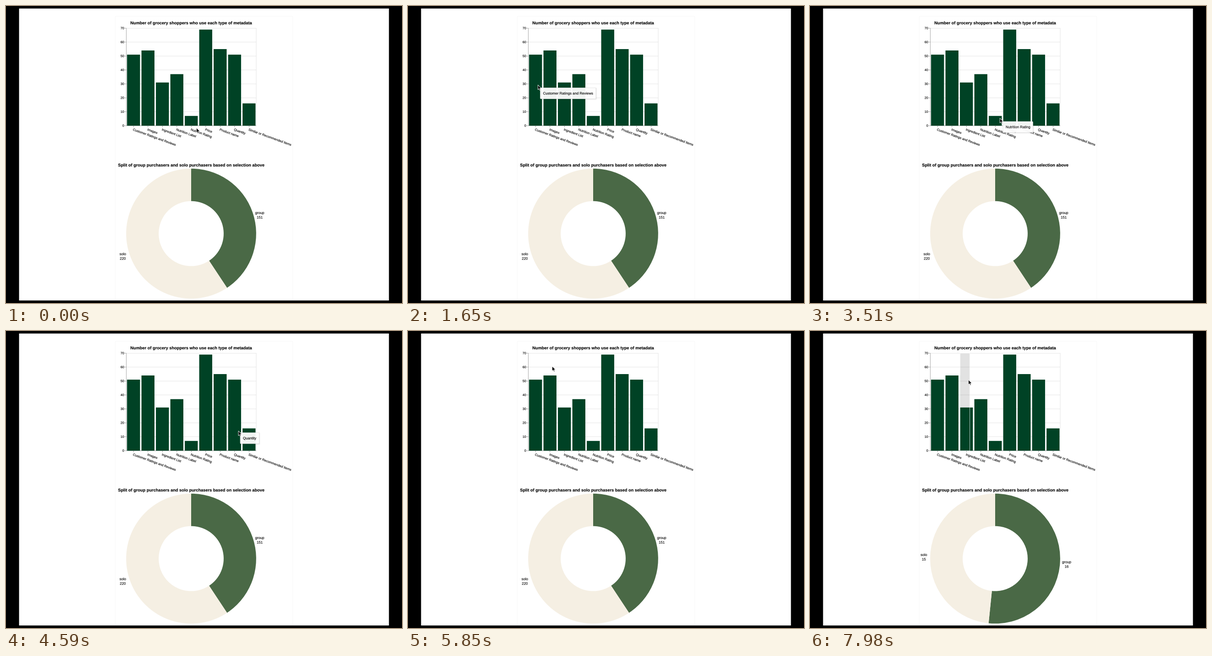
Animation, 864 px wide and 648 px high, one loop 8 s. Source, as a matplotlib script:

```python
import numpy as np
import matplotlib.pyplot as plt
from matplotlib.animation import FuncAnimation
from matplotlib.patches import (FancyBboxPatch, PathPatch, Polygon, Rectangle,
                                Wedge)
from matplotlib.path import Path
from matplotlib.textpath import TextPath

W, H = 864, 648
STEP, FRAMES = 32, 250
K = 0.709
LEFT, RIGHT, TOP, BOTTOM = 262.5, 546, 48.4, 261.1
CX, CY, RADIUS = 404, 496.6, 141.8
PAGE_LEFT, PAGE_RIGHT = 238.5, 625.5
TILT = np.radians(20)

BARS = {
    "Customer Ratings and Reviews": 51, "Images": 54, "Ingredient List": 31,
    "Nutrition Label": 37, "Nutrition Rating": 7, "Price": 69,
    "Product name": 55, "Quantity": 51, "Similar or Recommended Items": 16,
}
NAMES = list(BARS)
BAND = (RIGHT - LEFT) / len(BARS)
UNIT = (BOTTOM - TOP) / 70

# pointer stops: x, y, arrival time, pause
STOPS = [
    (415.5, 266, 0, 470), (280, 171, 1550, 0), (326, 186, 2070, 0),
    (334, 188, 2250, 200), (370, 198, 2610, 140), (414, 245, 3180, 295),
    (485, 176, 4290, 0), (507, 218, 4592, 0), (526, 224, 4720, 0),
    (321, 205, 5160, 140), (295, 132, 5590, 0), (314.5, 77, 5840, 0),
    (308.8, 79, 6060, 110), (330, 93, 6680, 0), (325.5, 99, 6960, 560),
    (346.5, 106.8, 8000, 0),
]
PRESS, RELEASE, DRAG = 6170, 6680, 7520

TRACK = np.array([(t + wait, x, y) for x, y, t, pause in STOPS
                  for wait in ((0, pause) if pause else (0,))])
TIMES, POINTS = TRACK[:, 0], TRACK[:, 1:]


def slopes():
    """Monotone tangents, so pauses stay still and nothing overshoots."""
    d = np.diff(POINTS, axis=0) / np.diff(TIMES)[:, None]
    a, b = d[:-1], d[1:]
    same = a * b > 0
    m = np.zeros_like(POINTS)
    m[1:-1] = np.where(same, 2 * a * b / np.where(same, a + b, 1), 0)
    m[-1] = d[-1]
    return m


TANGENTS = slopes()


def pointer(t):
    t = min(max(t, 0), TIMES[-1])
    i = min(np.searchsorted(TIMES, t, side="right") - 1, len(TIMES) - 2)
    h = TIMES[i + 1] - TIMES[i]
    u = (t - TIMES[i]) / h
    return ((1 + 2 * u) * (1 - u) ** 2 * POINTS[i]
            + u * (1 - u) ** 2 * h * TANGENTS[i]
            + u * u * (3 - 2 * u) * POINTS[i + 1]
            + u * u * (u - 1) * h * TANGENTS[i + 1])


fig = plt.figure(figsize=(W / 72, H / 72), dpi=72, facecolor="black")
ax = fig.add_axes([0, 0, 1, 1])
ax.set_xlim(0, W)
ax.set_ylim(H, 0)
ax.axis("off")


def rect(x0, y0, x1, y1, z, **style):
    style = {"lw": 0, "snap": False, **style}
    return ax.add_patch(Rectangle((x0, y0), x1 - x0, y1 - y0, zorder=z, **style))


def line(x0, y0, x1, y1, color, z=1, lw=K):
    ax.plot([x0, x1], [y0, y1], color=color, lw=lw, zorder=z, snap=False,
            solid_capstyle="butt")


def glyphs(s, size, x, y, align=0, weight="normal", tilt=0):
    """Outline of a line of text; align is 0 left, 0.5 centre, 1 right."""
    path = TextPath((0, 0), s, size=size * K,
                    prop={"family": "Liberation Sans", "weight": weight})
    v = (path.vertices - (align * path.get_extents().x1, 0)) * (1, -1)
    c, s = np.cos(tilt), np.sin(tilt)
    return Path(v @ np.array([[c, s], [-s, c]]) + (x, y), path.codes)


def text(path, z=4):
    return ax.add_patch(PathPatch(path, fc="black", ec="black", lw=0.12,
                                  snap=False, zorder=z))


def bar_span(i):
    x = LEFT + (i + 0.05) * BAND
    return x, x + 0.9 * BAND


# page
rect(28.5, 5.5, 835.5, 642.5, 0, fc="white")
for x in (PAGE_LEFT, PAGE_RIGHT):
    line(x, 22.5, x, 642, "#f5f5f5")
line(PAGE_LEFT, 22.5, PAGE_RIGHT, 22.5, "#f5f5f5")

# bar chart
text(glyphs("Number of grocery shoppers who use each type of metadata",
            13, CX, 40, 0.5, "bold"))
for v in range(0, 71, 10):
    y = BOTTOM - v * UNIT
    line(LEFT, y, RIGHT, y, "#dddddd")
    line(LEFT - 5 * K, y, LEFT, y, "#888888", z=1.5)
    text(glyphs(str(v), 10, LEFT - 7 * K, y + 2.3, 1))
line(RIGHT, TOP, RIGHT, BOTTOM, "#dddddd")
line(LEFT, TOP, LEFT, BOTTOM, "#888888", z=1.5)
line(LEFT, BOTTOM, RIGHT, BOTTOM, "#888888", z=1.5)

for i, (name, count) in enumerate(BARS.items()):
    x0, x1 = bar_span(i)
    rect(x0, BOTTOM - count * UNIT, x1, BOTTOM, 3, fc="#004225")
    mid = (x0 + x1) / 2
    line(mid, BOTTOM, mid, BOTTOM + 5 * K, "#888888", z=1.5)
    drop = 7.9 * K
    text(glyphs(name, 10, mid - drop * np.sin(TILT),
                BOTTOM + 7 * K + drop * np.cos(TILT), tilt=TILT))

# donut
text(glyphs("Split of group purchasers and solo purchasers based on "
            "selection above", 13, CX, 350.2, 0.5, "bold"))
BLANK = Path([(0, 0)])
slices = [(name,
           ax.add_patch(Wedge((CX, CY), RADIUS, 0, 90, width=RADIUS / 2,
                              fc=color, lw=0, zorder=3)),
           text(BLANK), text(BLANK))
          for name, color in (("group", "#4a6946"), ("solo", "#f5efe3"))]

# brush: grey behind the bars, white outline in front
brush_fill = rect(0, TOP, 1, BOTTOM, 2, fc="#333333", alpha=0.14)
brush_edge = rect(0, TOP, 1, BOTTOM, 5, fc="none", ec="white", lw=K)


# tooltip
def card(z, pad, **style):
    return ax.add_patch(FancyBboxPatch(
        (0, 0), 1, 1, boxstyle=f"round,pad={pad},rounding_size=1.6",
        zorder=z, **style))


shadows = [card(6, p * K, fc="black", ec="none", alpha=0.035) for p in range(3)]
box = card(6.1, 0, fc=(1, 1, 1, 0.95), ec="#e2e2e2", lw=K)
tip_lines = [text(BLANK, 6.2) for _ in range(2)]
tip_parts = [*shadows, box, *tip_lines]

ARROW = np.array([(0, 0), (0, 10.4), (2.4, 8.2), (4, 11.9), (5.7, 11.2),
                  (4.1, 7.6), (7.4, 7.4)])
arrow = ax.add_patch(Polygon(ARROW, closed=True, fc="black", ec="white",
                             lw=0.8, zorder=8))


def set_donut(*values):
    start = 0
    for (name, wedge, title, number), value in zip(slices, values):
        sweep = 360 * value / sum(values)
        wedge.set_theta1(start - 90)
        wedge.set_theta2(start + sweep - 90)
        mid = np.radians(start + sweep / 2)
        x = CX + 220 * K * np.sin(mid)
        y = CY - 220 * K * np.cos(mid) + 2.1
        title.set_path(glyphs(name, 11, x, y, 0.5))
        number.set_path(glyphs(str(value), 11, x, y + 14 * K, 0.5))
        start += sweep


def bar_under(x, y):
    for i, count in enumerate(BARS.values()):
        x0, x1 = bar_span(i)
        if x0 <= x <= x1 and BOTTOM - count * UNIT <= y <= BOTTOM:
            return NAMES[i]
    return None


def set_tooltip(x, y):
    name = bar_under(x, y)
    for part in tip_parts:
        part.set_visible(name is not None)
    if name is None:
        return
    left, top = x + 7, y + 7
    rows = [name]
    width = glyphs(name, 11, 0, 0).get_extents().width + 18 * K
    if left + width > PAGE_RIGHT:          # wraps at the page edge
        rows, width = name.rsplit(" ", 1), PAGE_RIGHT - left
    height = 24 + 9.4 * (len(rows) - 1)
    box.set_bounds(left, top, width, height)
    for s in shadows:
        s.set_bounds(left + 0.8, top + 0.8, width, height)
    tip_lines[1].set_visible(len(rows) > 1)
    for k, row in enumerate(rows):
        tip_lines[k].set_path(glyphs(row, 11, left + 6, top + 14.6 + 9.4 * k))


def brush_range(t):
    if t < PRESS:
        return None
    shift = pointer(max(t, DRAG))[0] - pointer(DRAG)[0]
    return pointer(PRESS)[0] + shift, pointer(min(t, RELEASE))[0] + shift


def set_brush(span):
    for part in (brush_fill, brush_edge):
        part.set_visible(span is not None)
    if span is None:
        set_donut(151, 220)
        return
    lo, hi = span
    for part in (brush_fill, brush_edge):
        part.set_x(lo)
        part.set_width(hi - lo)
    images, ingredients = (lo <= bar_span(i)[1] and hi >= bar_span(i)[0]
                           for i in (1, 2))
    set_donut(24 * images + 16 * ingredients, 30 * images + 15 * ingredients)


def draw(n):
    t = (n + 0.5) * STEP
    late = t - STEP                        # the page trails the pointer
    arrow.set_xy(ARROW + pointer(t))
    set_tooltip(*pointer(late))
    set_brush(brush_range(late))
    return []


anim = FuncAnimation(fig, draw, frames=FRAMES, interval=STEP,
                     init_func=lambda: draw(0), repeat=True, repeat_delay=0,
                     blit=False)
plt.show()
```
